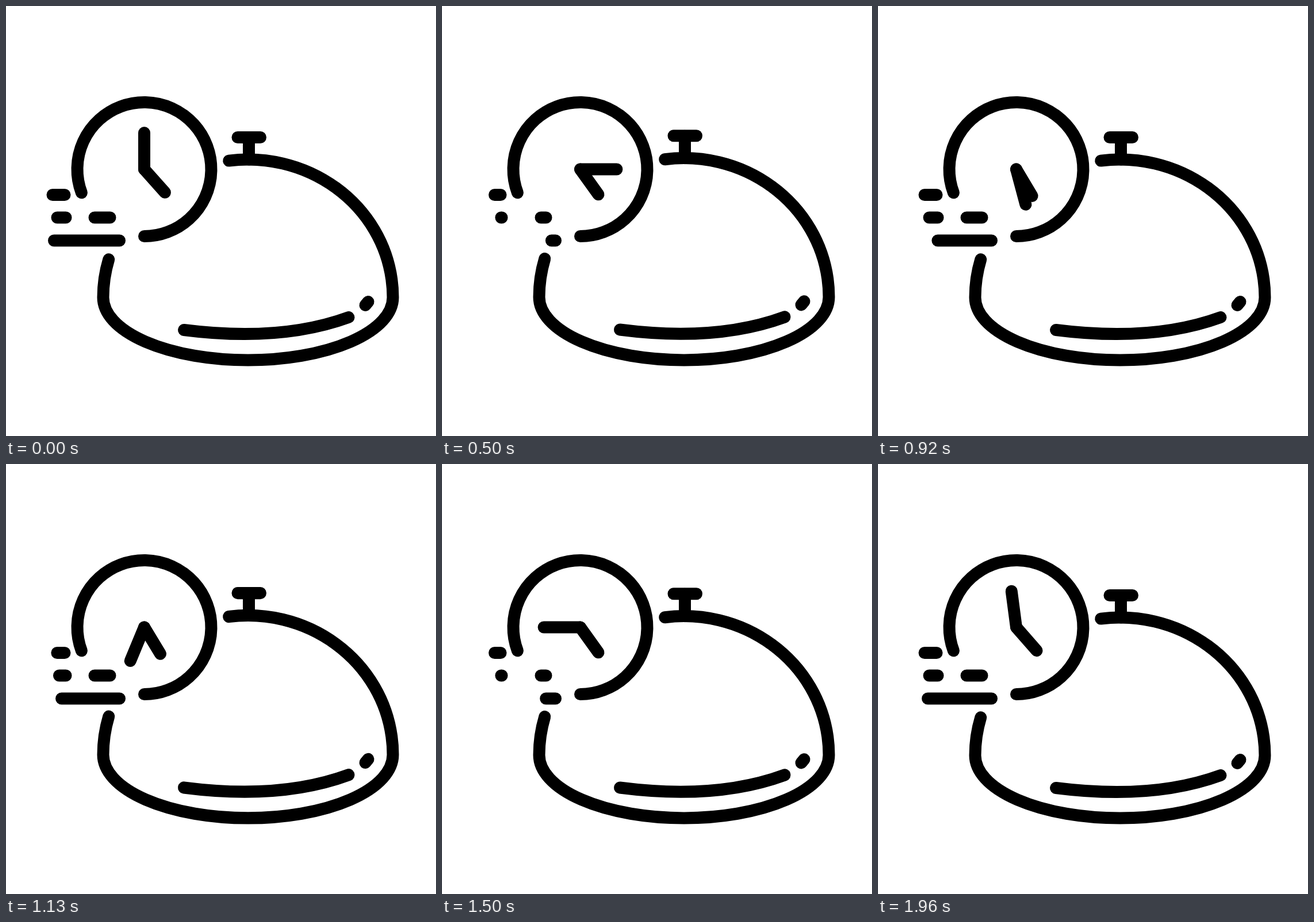
An HTML page with a canvas that plays this animation: 748x748 px, repeating every 2000 ms.

```html
<!DOCTYPE html>
<html lang="en">
<head>
<meta charset="utf-8">
<title>Fast meal delivery</title>
<style>
html, body { margin: 0; width: 100%; height: 100%; overflow: hidden; background: #fff; }
canvas { display: block; }
</style>
</head>
<body>
<canvas id="stage" width="748" height="748"></canvas>
<script>
const ctx = document.getElementById('stage').getContext('2d');
const LOOP = 2000, STEPS = 48, HALF = STEPS / 2;
const RAD = Math.PI / 180;
const clamp = v => Math.max(0, Math.min(1, v));
const ease = v => (1 - Math.cos(Math.PI * v)) / 2;

// 0 at start, 1 at peak, 0 again at end
function ramp(s, start, peak, end) {
  return clamp(s < peak ? (s - start) / (peak - start) : (end - s) / (end - peak));
}

function line(x1, y1, x2, y2) {
  ctx.beginPath();
  ctx.moveTo(x1, y1);
  ctx.lineTo(x2, y2);
  ctx.stroke();
}

// dash whose left end is pulled towards its right end
function dash(x1, x2, y, pull) {
  line(x1 + (x2 - x1) * Math.min(pull, 0.995), y, x2, y);
}

function hand(angle, length) {
  const x = 240.5, y = 284;
  line(x, y, x + Math.sin(angle * RAD) * length, y - Math.cos(angle * RAD) * length);
}

function drawClock(s) {
  ctx.beginPath();
  ctx.arc(240.5, 284, 116.5, 159.5 * RAD, 450 * RAD);
  ctx.stroke();
  hand(s * 360 / STEPS, 63.4);
  hand(138.3 + 12 * ramp(s, 0, HALF, STEPS), 54);
}

function drawDashes(s) {
  const h = s % HALF;
  dash(81, 102, 328.5, ramp(h, 0, 8, 16));
  dash(89, 104, 368, ramp(h, 0, 13, 22));
  dash(154, 181, 368, ramp(h, 6, 15, 22));
  dash(83.5, 197.5, 408, s < HALF ? ramp(s, 0, 12.8, 24) : ramp(s, 25.6, 37.8, 47.25));
}

function drawCloche(s) {
  const base = 620, cx = 421, rim = 507, rx = 252, top = 240, bottom = 109;
  const lift = ease(ramp(s % HALF, 0, 6, 16));
  ctx.save();
  ctx.translate(0, base);
  ctx.scale(1, 1 + 0.02 * lift);
  ctx.translate(0, -base);

  ctx.beginPath();
  ctx.ellipse(cx, rim, rx, top, 0, 262.4 * RAD, 360 * RAD);
  ctx.ellipse(cx, rim, rx, bottom, 0, 0, Math.PI);
  ctx.ellipse(cx, rim, rx, top, 0, Math.PI, 196 * RAD);
  ctx.stroke();

  line(403, 228.5, 442.5, 228.5);
  line(422.5, 229, 422.5, 267);

  ctx.beginPath();
  ctx.moveTo(309.5, 563.5);
  ctx.quadraticCurveTo(477, 585, 596, 541.5);
  ctx.stroke();
  line(630, 514.5, 625, 520.5);
  ctx.restore();
}

function draw(now) {
  // 24 poses a second, switched on a 10 ms clock
  const t = Math.floor((now % LOOP) / 10) * 10;
  const s = Math.floor((t + 4.9) * STEPS / LOOP) % STEPS;
  ctx.fillStyle = '#fff';
  ctx.fillRect(0, 0, 748, 748);
  ctx.strokeStyle = '#000';
  ctx.lineWidth = 21;
  ctx.lineCap = ctx.lineJoin = 'round';
  drawClock(s);
  drawDashes(s);
  drawCloche(s);
}

const begin = performance.now();
function tick() {
  draw(performance.now() - begin);
  requestAnimationFrame(tick);
}
tick();
</script>
</body>
</html>
```
